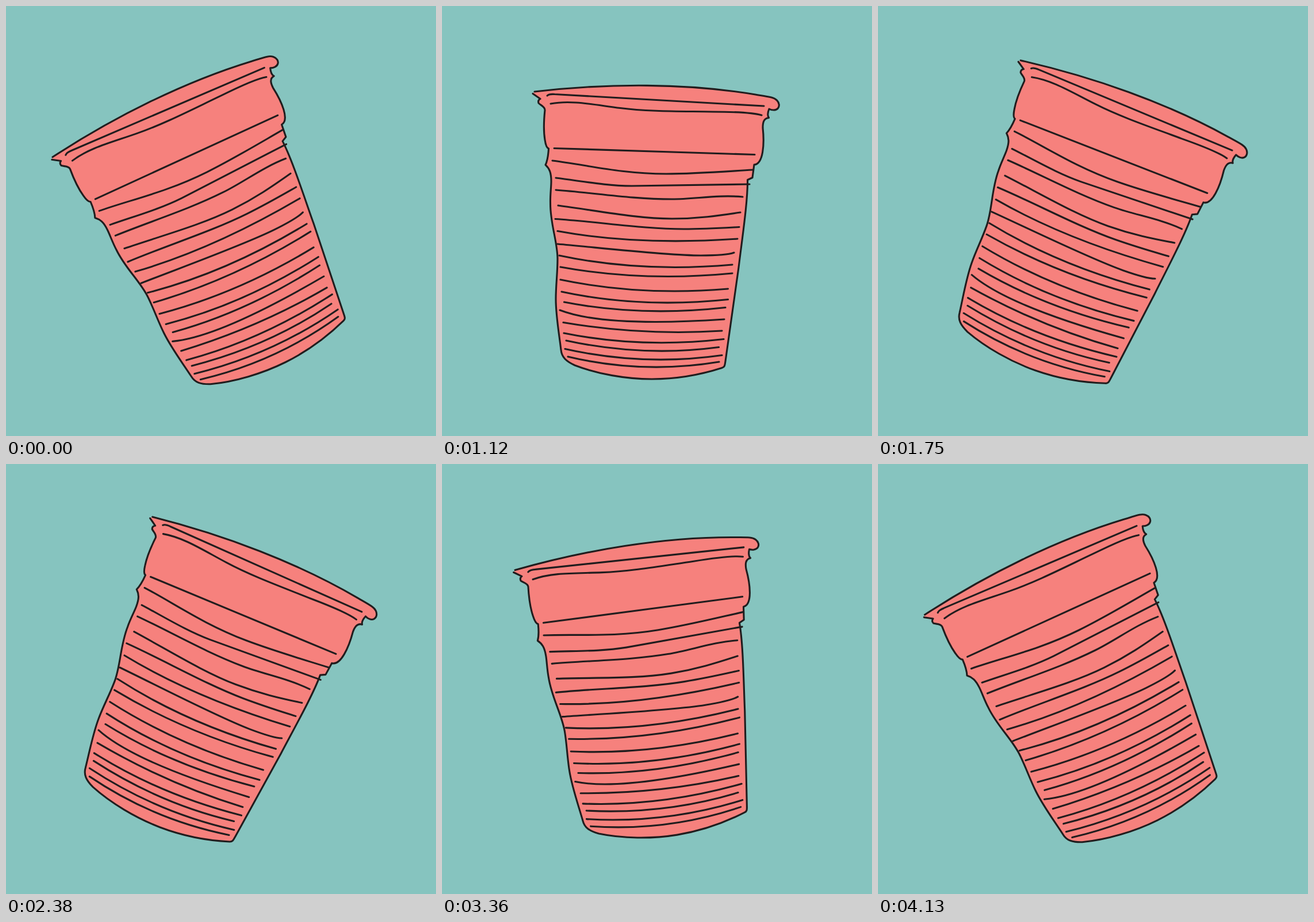
Animation, 748 px wide and 748 px high, one loop 4.2 s. Source, as an HTML page:

```html
<!DOCTYPE html>
<html lang="en">
<head>
<meta charset="utf-8">
<title>Swinging cup</title>
<style>
  html, body { margin: 0; width: 100%; height: 100%; overflow: hidden; background: #86c4bf; }
  svg { display: block; width: 100%; height: 100%; }
  path { stroke: #211d1e; stroke-width: 3.1; stroke-linecap: round; stroke-linejoin: round; fill: none; }
  #body { fill: #f6817d; }
</style>
</head>
<body>
<svg viewBox="0 0 748 748">
  <g id="cup">
    <path id="body" d="M161 149 C290 134 425 134 545 154 C557 156 565 157 573 159
      C590 163 590 181 577 181 C573 181 571 180 569 179 C567 184 566 191 568.5 194.5
      C559 195 558 204 558 212 C561 240 559 275 543 276 L540 298.500 L531.500 302.500
      C532 340 522 405 516 455 L493 618 C492 625 492 628 487 629.500
      C445 643 405 649 365 649 C320 649 270 640 231 625 C216 618 208 611 207 598
      C203 565 198 538 198 510 C198 485 201 465 201 440 C201 410 188 378 188.500 343
      C188 330 190 315 190 305 C190 290 187 283 180 276.500 C183 270 185 257 185.500 248
      C182 247 180 240 179 233 C176 215 177 200 179 181 C179 175 172 173 168 169
      C167 166 168 163 171 161.500 L158 152.500"/>
    <path d="M183 156 C186 153 190 153 196 153.500 Q380 163.500 560 174"/>
    <path d="M189 170 C225 163 265 172 310 177.500 C360 184 420 183 470 184 C510 184 540 185 556 190"/>
    <path d="M195 247.500 L544 258.500"/>
    <path d="M192 269 C250 276 310 292 390 292 C440 292 490 288 540 285"/>
    <path d="M198 299 C240 304 285 313 330 313 C400 312 470 311 535 310"/>
    <path d="M198 320 C265 325 330 336 400 336 C440 336 480 328 523 332"/>
    <path d="M202 347 C270 356 340 370 400 370 C445 370 480 365 519 359"/>
    <path d="M197 370.500 C270 375 350 388 420 388 C460 388 490 386 517 384.500"/>
    <path d="M201 414 C270 420 390 434 450 434 C480 434 497 433 508 429"/>
  </g>
</svg>
<script>
  const STEP = 70, HALF = 2100, LOOP = 4200;
  const LOW = -26.46, SWING = 49;
  const cup = document.getElementById('cup');

  // Ridges: start, control point, end
  const ridges = [
    [201, 391.5, 340, 417, 514, 405],
    [204, 434, 345, 464, 505, 450],
    [206, 454, 350, 480, 505, 465],
    [206, 476, 345, 505, 497.5, 492],
    [208, 497, 345, 526.5, 497.5, 510.5],
    [212.5, 515, 345, 541, 493, 524.5],
    [205, 529, 282, 559, 491, 545],
    [211, 550.5, 350, 574, 487, 565],
    [212, 569, 345, 596, 490, 579.5],
    [216, 582, 350, 611, 481.5, 593.5],
    [214, 596.5, 350, 627, 487, 607.5],
    [219, 610, 350, 641, 482, 619]
  ];
  for (const [x, y, cx, cy, ex, ey] of ridges) {
    const path = document.createElementNS('http://www.w3.org/2000/svg', 'path');
    path.setAttribute('d', `M${x} ${y} Q${cx} ${cy} ${ex} ${ey}`);
    cup.appendChild(path);
  }

  const bezier = (a, b, s) => 3 * a * s * (1 - s) ** 2 + 3 * b * s * s * (1 - s) + s ** 3;

  // Cubic-bezier easing, solved by bisection
  function ease(p) {
    let lo = 0, hi = 1;
    for (let i = 0; i < 24; i++) {
      const mid = (lo + hi) / 2;
      if (bezier(0.415, 0.61, mid) < p) lo = mid; else hi = mid;
    }
    return bezier(0, 1, lo);
  }

  function draw(time) {
    const t = Math.floor((time % LOOP) / STEP) * STEP;
    const p = ease((t % HALF) / HALF);
    const angle = LOW + SWING * (t < HALF ? p : 1 - p);
    cup.setAttribute('transform', `rotate(${angle.toFixed(3)} 363 376)`);
  }

  const start = performance.now();
  function tick() {
    draw(performance.now() - start);
    requestAnimationFrame(tick);
  }
  tick();
</script>
</body>
</html>
```
